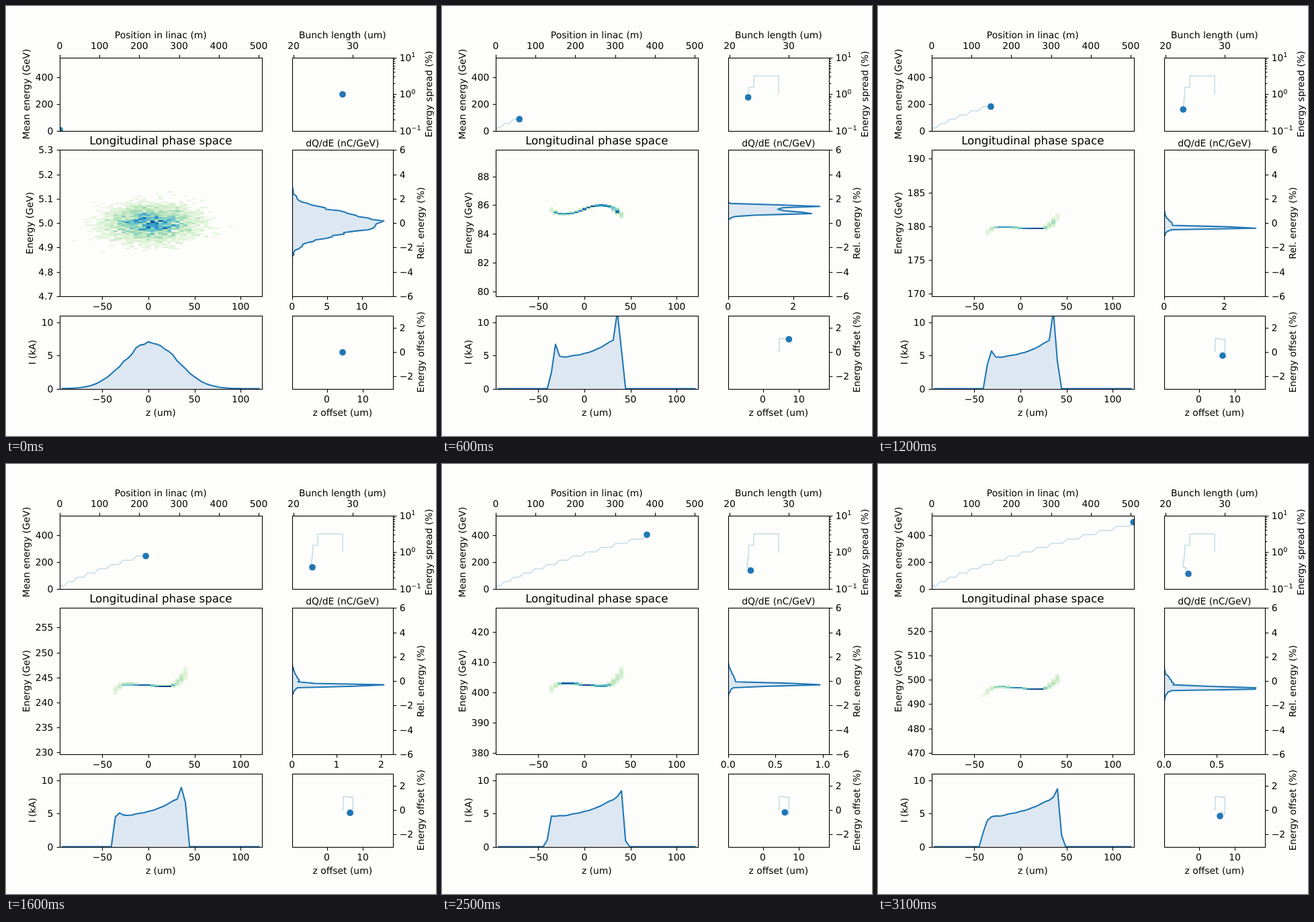
An HTML page that plays this animation: 640x640 px, repeating every 3200 ms.

```html
<!DOCTYPE html>
<html lang="en">
<head>
<meta charset="utf-8">
<title>Longitudinal phase space</title>
<style>
  html, body { margin: 0; width: 100%; height: 100%; overflow: hidden; background: #fdfdfb; }
  svg { display: block; width: 100vw; height: 100vh; }
  text { font-family: "DejaVu Sans", sans-serif; font-size: 13.89px; white-space: pre; text-rendering: geometricPrecision; }
  .title { font-size: 16.67px; }
  .power { font-size: 9.72px; }
  .axis { fill: none; stroke: #000; stroke-width: 1.11; }
  .line { fill: none; stroke: #1f77b4; stroke-width: 2.08; stroke-linejoin: round; }
  .fill { fill: #dce7f1; }
  .trail { fill: none; stroke: #1f77b4; stroke-opacity: .25; stroke-width: 1.5; }
  .dot { fill: #1f77b4; }
  .cells { shape-rendering: crispEdges; }
</style>
</head>
<body>
<svg viewBox="0 0 640 640">
  <defs id="clips"></defs>
  <g id="plots"></g>
  <g id="axes"></g>
  <g id="scales"></g>
</svg>
<script>
const STEP_MS = 100, STEPS = 32;
const Z_BINS = 49, E_BINS = 100, PARTICLES = 5000;

// Grid of panels: columns 2:1, rows 1:2:1.
const LEFT = [80, 380.6], RIGHT = [425.7, 576];
const TOP = [76.8, 185.51], MIDDLE = [214.49, 431.9], BOTTOM = [460.89, 569.6];
const panel = ([x0, x1], [y0, y1]) => ({ x0, x1, y0, y1, cx: (x0 + x1) / 2, cy: (y0 + y1) / 2 });
const P = {
  energy: panel(LEFT, TOP), spread: panel(RIGHT, TOP),
  phase: panel(LEFT, MIDDLE), spectrum: panel(RIGHT, MIDDLE),
  current: panel(LEFT, BOTTOM), offset: panel(RIGHT, BOTTOM),
};
const PERCENT = (MIDDLE[1] - MIDDLE[0]) / 12;
const DECADE = (TOP[1] - TOP[0]) / 2;
const KILOAMP = (BOTTOM[1] - BOTTOM[0]) / 11;
const zWidth = (LEFT[1] - LEFT[0]) / Z_BINS;
const eHeight = (MIDDLE[1] - MIDDLE[0]) / E_BINS;
const binX = i => LEFT[0] + (i + .5) * zWidth;
const zToX = z => 212 + z * 1.372;
const xToZ = x => (x - 212) / 1.372;
const gevToY = e => TOP[1] - e * .199;

const $ = id => document.getElementById(id);
const mix = (a, b, k) => a + (b - a) * k;
const clamp = v => Math.min(1, Math.max(0, v));
const bump = (d, width) => Math.exp(-((d / width) ** 2));

// Odd steps end an accelerating stage, even steps end a drift.
const stages = step => Math.ceil(step / 2);
const drifts = step => Math.floor(step / 2);
const nominal = n => n ? 20.95 + 31.9 * (n - 1) : 5;

// Piecewise linear curve through x, y pairs.
const curve = (...p) => x => {
  if (x <= p[0]) return p[1];
  for (let i = 2; i < p.length; i += 2)
    if (x <= p[i]) return mix(p[i - 1], p[i + 1], (x - p[i - 2]) / (p[i] - p[i - 2]));
  return p[p.length - 1];
};

// Marker positions by stage or drift.
const spreadY = curve(0, 131.5, 1, 104, 2, 121, 3, 136, 6, 154, 10, 153.5, 16, 163.5);
const lengthX = curve(0, 501, 1, 464, 2, 456.5, 5, 454, 6, 454.3, 15, 462);
const offsetY = curve(0, 515.5, 1, 513, 2, 495, 3, 496, 5, 521, 10, 518, 13, 518.5, 16, 524);
const offsetX = curve(0, 501, 1, 502, 3, 516.4, 5, 516, 6, 513, 15, 509);

// Bunch profile by drift: a body between head and tail, with a horn at each end.
const head = curve(1, -45, 3, -38, 10, -40.5, 15, -42.5);
const tail = curve(1, 51, 3, 43, 6, 42.3, 10, 44.8, 15, 45.6);
const tailWidth = curve(1, 14, 3, 4.5);
const headHorn = curve(1, 0, 3, 1.9, 6, 1.3, 10, .3, 15, -.6);
const tailHorn = curve(1, 0, 3, 5, 6, 4.2, 10, .4, 15, 1);
const base = curve(1, 5.8, 3, 5.3);
const bend = curve(1, -.0005, 3, .0008, 15, .0005);

// Energy shape by stage: a wave along the core, ends that curl away.
const wave = curve(0, 0, 1, 12, 3, 6.5, 6, -1, 10, -1.6, 16, -1.7);
const curl = curve(0, 0, 1, .26, 3, .02, 6, -.045, 10, -.06, 16, -.04);
const thickness = curve(0, 16, 1, 3, 3, 1, 6, .5);
const peakCharge = curve(0, 13.15, 1, 4.1, 3, 2.82, 6, 3.05, 10, 1.07, 16, .87);

let seed = 4711;
const random = () => (seed = (seed * 16807) % 2147483647) / 2147483647;
random();
const wobble = Array.from({ length: Z_BINS }, () => 1 + .1 * (random() - .5));
const gauss = Array.from({ length: PARTICLES }, () =>
  Math.sqrt(-2 * Math.log(random())) * Math.cos(2 * Math.PI * random()));

function current(j, z) {
  if (!j) return 7 * bump(z - 3, 40);
  const body = base(j) + .04 * z + bend(j) * z * z;
  const horns = headHorn(j) * bump(z - head(j) - 6.3, 2.5) + tailHorn(j) * bump(z - tail(j) + 6, 2.5);
  return (body + horns) * clamp((z - head(j)) / 4.5) * clamp((tail(j) - z) / tailWidth(j));
}

const profile = j => wobble.map((w, i) => current(j, xToZ(binX(i))) * (j ? mix(1, w, .3) : w));

function energyShape(n, z) {
  const reach = Math.max(0, Math.abs(z + 1) - 23);
  const centre = P.phase.cy + offsetY(n) - P.offset.cy - 35 * curl(n);
  return {
    y: centre - wave(n) * Math.sin(2 * Math.PI * (z + 2) / 80) + Math.sign(z) * curl(n) * reach ** 2,
    sigma: thickness(n) + Math.min(9, 6 * Math.abs(curl(n)) * reach),
  };
}

// Particles per z bin and energy row, spread along the bunch by its current.
function histogram(n, kA) {
  const counts = new Uint16Array(Z_BINS * E_BINS);
  const total = kA.reduce((a, b) => a + b);
  let bin = 0, sum = kA[0], shape = energyShape(n, xToZ(binX(0)));
  gauss.forEach((g, i) => {
    while (sum < (i + .5) / PARTICLES * total && bin < Z_BINS - 1) {
      sum += kA[++bin];
      shape = energyShape(n, xToZ(binX(bin)));
    }
    const row = Math.floor((shape.y + shape.sigma * g - P.phase.y0) / eHeight);
    if (row >= 0 && row < E_BINS) counts[bin * E_BINS + row]++;
  });
  return counts;
}

const COLORS = ['f7fcf0', 'e0f3db', 'ccebc5', 'a8ddb5', '7bccc4', '4eb3d3', '2b8cbe', '0868ac', '084081']
  .map(h => [0, 2, 4].map(i => parseInt(h.slice(i, i + 2), 16)));
function color(v) {
  const s = v * (COLORS.length - 1), i = Math.min(COLORS.length - 2, Math.floor(s));
  return `rgb(${COLORS[i].map((c, k) => Math.round(mix(c, COLORS[i + 1][k], s - i)))})`;
}

const snap = v => Math.round(v) + .5;
const minus = v => String(v).replace('-', '\u2212');
const text = (x, y, s, anchor = 'middle', extra = '') =>
  `<text x="${x}" y="${y}" text-anchor="${anchor}" ${extra}>${s}</text>`;
const vertical = (x, y, s) => text(x, y, s, 'middle', `transform="rotate(-90 ${x} ${y})"`);
const rule = (x, y, dx, dy) => `<path class="axis" d="M${snap(x)} ${snap(y)}l${dx} ${dy}"/>`;
const tick = {
  left: (p, y, s) => rule(p.x0, y, -4.86, 0) + text(p.x0 - 9.7, y + 5, s, 'end'),
  right: (p, y, s) => rule(p.x1, y, 4.86, 0) + text(p.x1 + 9.7, y + 5, s, 'start'),
  top: (p, x, s) => rule(x, p.y0, 0, -4.86) + text(x, 64, s),
  bottom: (p, x, s) => rule(x, p.y1, 0, 4.86) + text(x, p.y1 + 20.5, s),
};
const path = (points, cls, end = '') =>
  `<path class="${cls}" d="M${points.map(q => q.map(v => v.toFixed(2)).join(' ')).join('L')}${end}"/>`;
const clipped = (name, body) => `<g clip-path="url(#${name})">${body}</g>`;
const marker = points => {
  const [x, y] = points[points.length - 1];
  return path(points, 'trail') + `<circle class="dot" cx="${x}" cy="${y}" r="4.86"/>`;
};
const rect = (x0, y0, x1, y1, extra = '') =>
  `<rect x="${x0}" y="${y0}" width="${x1 - x0}" height="${y1 - y0}" ${extra}/>`;

function staticAxes() {
  let s = '';
  for (const p of Object.values(P)) s += rect(snap(p.x0), snap(p.y0), snap(p.x1), snap(p.y1), 'class="axis"');
  for (let m = 0; m <= 500; m += 100) s += tick.top(P.energy, 80 + m * .592, m);
  for (const e of [0, 200, 400]) s += tick.left(P.energy, gevToY(e), e);
  s += tick.top(P.spread, 428, 20) + tick.top(P.spread, 516, 30);
  for (const d of [-1, 0, 1]) {
    const y = P.spread.cy - DECADE * d;
    s += tick.right(P.spread, y, `10<tspan class="power" dy="-5.5">${minus(d)}</tspan>`);
    for (let k = 2; d < 1 && k < 10; k++) s += rule(P.spread.x1, y - DECADE * Math.log10(k), 2.78, 0);
  }
  for (const z of [-50, 0, 50, 100])
    for (const p of [P.phase, P.current]) s += tick.bottom(p, zToX(z), minus(z));
  for (let r = -6; r <= 6; r += 2) s += tick.right(P.spectrum, P.spectrum.cy - r * PERCENT, minus(r));
  for (const i of [0, 5, 10]) s += tick.left(P.current, P.current.y1 - i * KILOAMP, i);
  for (const r of [-2, 0, 2]) s += tick.right(P.offset, P.offset.cy - r * PERCENT, minus(r));
  s += tick.bottom(P.offset, 477.5, 0) + tick.bottom(P.offset, 531, 10);
  return s
    + text(P.energy.cx, 48, 'Position in linac (m)') + text(P.spread.cx, 48, 'Bunch length (um)')
    + text(P.phase.cx, 206, 'Longitudinal phase space', 'middle', 'class="title"')
    + text(P.spectrum.cx, 209, 'dQ/dE (nC/GeV)')
    + text(P.current.cx, 610, 'z (um)') + text(P.offset.cx, 610, 'z offset (um)')
    + vertical(35, P.energy.cy, 'Mean energy (GeV)') + vertical(44.5, P.current.cy, 'I (kA)')
    + vertical(634.5, P.spread.cy, 'Energy spread (%)') + vertical(622.5, P.spectrum.cy, 'Rel. energy (%)')
    + vertical(622.5, P.offset.cy, 'Energy offset (%)');
}

// Round tick step leaving at most `count` intervals in the range.
function niceStep(range, count) {
  const raw = range / count, unit = 10 ** Math.floor(Math.log10(raw));
  return unit * [1, 2, 2.5, 5, 10].find(m => m * unit >= raw - 1e-9);
}
const decimals = step => step % 1 ? 1 : 0;

function scales(n) {
  const e = nominal(n), step = niceStep(.12 * e, 7), digits = decimals(step);
  let s = '', widest = 0;
  for (let k = Math.ceil(.94 * e / step - 1e-6); k * step <= 1.06 * e + 1e-6; k++) {
    const label = (k * step).toFixed(digits);
    widest = Math.max(widest, label.replace('.', '').length * 8.84 + digits * 4.4);
    s += tick.left(P.phase, P.phase.cy - (k * step / e - 1) * 100 * PERCENT, label);
  }
  s += vertical(61.7 - widest, P.phase.cy, 'Energy (GeV)');
  const top = peakCharge(n) * 1.1, gap = niceStep(top, 3);
  for (let q = 0; q <= top; q += gap)
    s += tick.bottom(P.spectrum, mix(...RIGHT, q / top), q.toFixed(decimals(gap)));
  return s;
}

function phaseCells(counts) {
  const max = Math.max(...counts);
  let s = '';
  counts.forEach((c, i) => {
    if (c / max < .06) return;
    const x = LEFT[0] + Math.floor(i / E_BINS) * zWidth, y = P.phase.y0 + i % E_BINS * eHeight;
    s += rect(x, y, x + zWidth, y + eHeight, `fill="${color(c / max)}"`);
  });
  return `<g class="cells">${s}</g>`;
}

function area(points, end) {
  return path(points, 'fill', end) + path(points, 'line');
}

function spectrum(counts) {
  const rows = Array(E_BINS).fill(0);
  counts.forEach((c, i) => rows[i % E_BINS] += c);
  const max = Math.max(...rows);
  const points = rows.map((c, r) => [mix(...RIGHT, c / max / 1.1), P.spectrum.y0 + (r + .5) * eHeight]);
  return area(points, `L${RIGHT[0]} ${MIDDLE[1]}L${RIGHT[0]} ${MIDDLE[0]}Z`);
}

function linacPath(step) {
  const points = [];
  let x = LEFT[0];
  for (let i = 0; i <= step; i++) {
    if (i) x += i === 1 ? 1.6 : i % 2 ? 6.55 : 4.95 * Math.sqrt(i / 2);
    const n = stages(i), offset = (P.offset.cy - offsetY(n)) / PERCENT / 100;
    points.push([x, gevToY(nominal(n) * (1 + offset))]);
  }
  return points;
}

function draw(step) {
  const n = stages(step), kA = profile(drifts(step)), counts = histogram(n, kA);
  const follow = (xOf, yOf) => Array.from({ length: step + 1 }, (_, i) => [xOf(drifts(i)), yOf(stages(i))]);
  const bunch = kA.map((v, i) => [binX(i), P.current.y1 - v * KILOAMP]);
  $('plots').innerHTML =
    clipped('energy', marker(linacPath(step)))
    + clipped('spread', marker(follow(lengthX, spreadY)))
    + clipped('phase', phaseCells(counts))
    + clipped('spectrum', spectrum(counts))
    + clipped('current', area(bunch, 'Z'))
    + clipped('offset', marker(follow(offsetX, offsetY)));
  $('scales').innerHTML = scales(n);
}

$('clips').innerHTML = Object.entries(P).map(([name, p]) =>
  `<clipPath id="${name}">${rect(...[p.x0, p.y0, p.x1, p.y1].map(Math.round))}</clipPath>`).join('');
$('axes').innerHTML = staticAxes();

const start = performance.now();
let shown = -1;
function play() {
  const step = Math.floor((performance.now() - start) / STEP_MS) % STEPS;
  if (step !== shown) draw(shown = step);
  requestAnimationFrame(play);
}
play();
</script>
</body>
</html>
```
